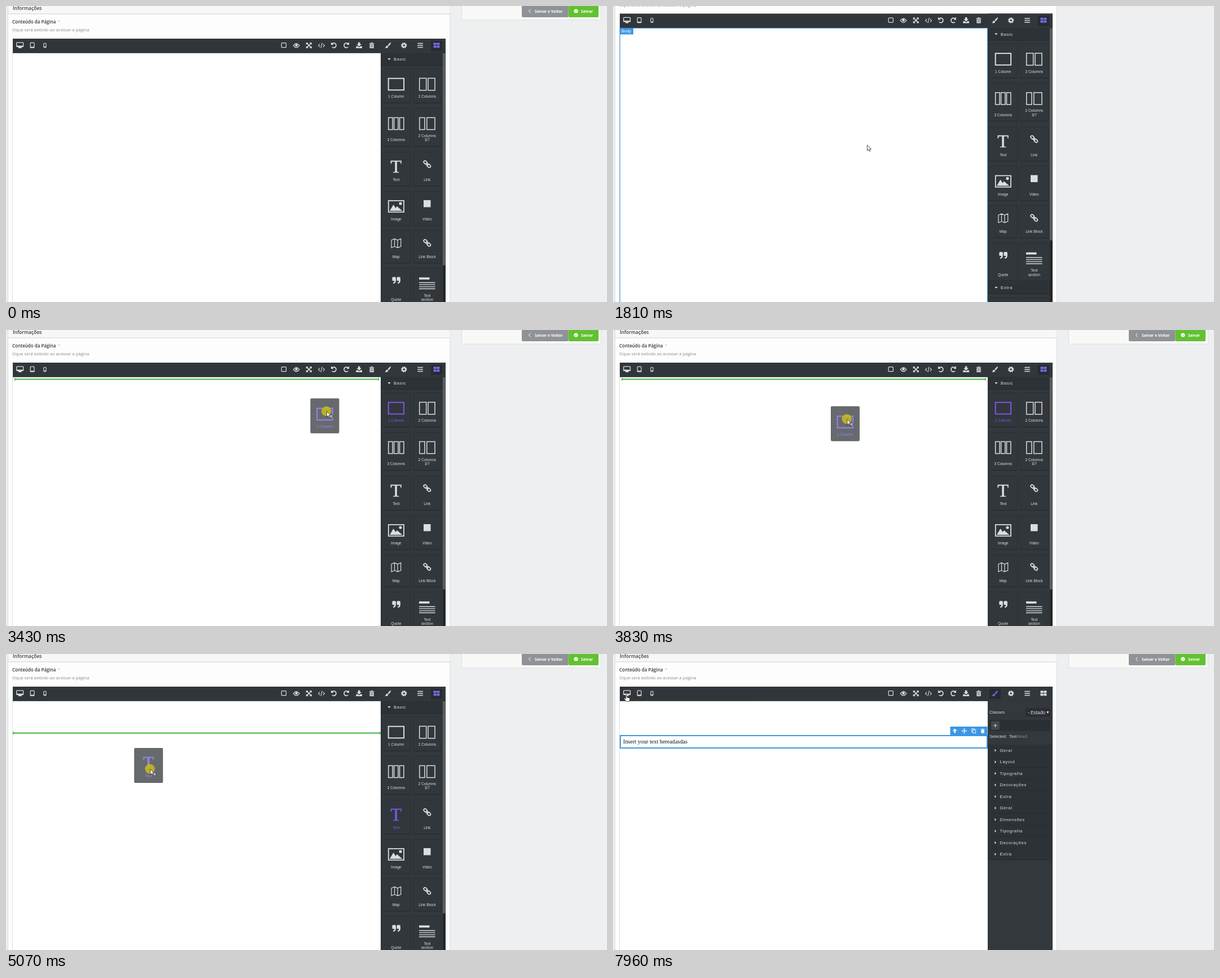
Recreate the animation shown at these times as an HTML page. Size 1065 by 526 pixels, loop 8 s.

```html
<!DOCTYPE html>
<html lang="pt">
<head>
<meta charset="utf-8">
<title>Page builder</title>
<style>
html, body { margin: 0; width: 100%; height: 100%; overflow: hidden; background: #edeff1; }
svg { display: block; width: 1065px; height: 526px; }
text { font: 6.66px "Liberation Sans", Arial, sans-serif; fill: currentColor; white-space: pre; }
.ui { font-family: "Open Sans", "Noto Sans", sans-serif; }
.mid { text-anchor: middle; }
.cat { font-size: 7.7px; letter-spacing: .64px; }
.line { fill: none; stroke: currentColor; }
.block, .tool { color: #dcdddd; }
.block.hot { color: #7a56e8; }
.tool.on { color: #746ce8; }
.tool .bg { fill: none; }
.tool.on .bg { fill: #272b30; }
</style>
</head>
<body>
<svg id="stage" viewBox="0 0 1065 526"></svg>
<script>
const LOOP = 8000, SCROLL = 44.5, BLUE = '#3b97e3', GREEN = '#62bd5f';
const stage = document.getElementById('stage');

const rect = (x, y, w, h, fill, more = '') =>
  `<rect x="${x}" y="${y}" width="${w}" height="${h}" fill="${fill}" ${more}/>`;
const frame = (x, y, w, h, sw = 1.5, more = '') =>
  `<rect x="${x}" y="${y}" width="${w}" height="${h}" class="line" stroke-width="${sw}" ${more}/>`;
const text = (x, y, s, more = '') => `<text x="${x}" y="${y}" ${more}>${s}</text>`;
const line = (d, sw = 1.5, more = '') => `<path d="${d}" class="line" stroke-width="${sw}" ${more}/>`;
const fill = (d, color = 'currentColor') => `<path d="${d}" fill="${color}"/>`;
const group = (id, body, more = '') => `<g id="${id}" ${more}>${body}</g>`;
const tool = (id, x, body) => group(id, rect(x - 10, 62, 20, 18, '', 'class="bg" rx="1"').replace('fill=""', '') + body, 'class="tool"');

// ---- page ----
const page = () =>
  rect(3.5, -20, 783, 640, '#fdfdfd', 'stroke="#dcdee0"') +
  rect(4, -20, 782.5, 34, '#f7f7f5') + rect(3, 13.5, 784, 1, '#d2d4d5') +
  text(12, 7, 'Informações', 'class="ui" style="font-size:8.5px;font-weight:600" fill="#333" color="#383b3e"') +
  text(11, 31, 'Conteúdo da Página', 'class="ui" style="font-size:8px;font-weight:600" color="#33373a"') +
  text(92, 30, '*', 'class="ui" color="#e5a09a"') +
  text(11, 45, 'Oque será exibido ao acessar a página', 'class="ui" style="font-size:7.65px" color="#85898d"') +
  rect(807.5, -20, 247, 45, '#f8f8f7', 'stroke="#dddfe1"') +
  rect(914, -10, 82.5, 30, '#8f9296', 'rx="2"') + rect(996.5, -10, 53.5, 30, '#62c132', 'rx="2"') +
  `<g color="#fff">${line('M929.5 5.5l-3 3.5 3 3.5', 1)}
   ${text(937, 12.2, 'Salvar e Voltar', 'class="ui" style="font-size:6.85px;font-weight:700"')}
   <circle cx="1010" cy="9" r="3.6" fill="#fff"/>
   <path d="M1008.3 9l1.3 1.4 2.2-2.6" stroke="#62c132" fill="none"/>
   ${text(1019, 12.2, 'Salvar', 'class="ui" style="font-size:6.85px;font-weight:700"')}</g>`;

// ---- toolbar ----
const undo = line('M577.6 67.2A4.2 4.2 0 1 1 577.8 73', 1.7) + fill('M576 64.3v4.8h4.8z');
const toolbar = () =>
  rect(12, 58, 767, 25.5, '#31363b') + rect(12, 82.5, 767, 1, '#272c30') +
  `<g class="tool">
  ${frame(18.8, 64.8, 11.8, 7.6, 1.3, 'rx="1"')}${rect(19, 70.5, 11.5, 2, 'currentColor')}${rect(22, 73, 5.5, 2, 'currentColor')}
  ${frame(43.2, 65.2, 6.8, 9, 1.2, 'rx="1"')}${rect(43.2, 72.4, 6.8, 1.6, 'currentColor')}
  ${frame(66.8, 66.2, 4.2, 7.4, 1.1, 'rx="1"')}${rect(67, 72.2, 4, 1.4, 'currentColor')}
  ${frame(488.2, 65.7, 8.2, 8, 1.2, 'rx="1.3"')}
  ${line('M509.3 70.2q5.3-7.4 10.6 0q-5.3 7.4-10.6 0z', 1.2)}<circle cx="514.6" cy="69.6" r="2.4" fill="currentColor"/>
  ${line('M533 66.3l7.6 7.6M540.6 66.3l-7.6 7.6', 1.6)}
  ${fill('M531.8 65v4l4-4zM541.8 65v4l-4-4zM531.8 75v-4l4 4zM541.8 75v-4l-4 4z')}
  ${line('M556.2 67.3l-2.6 2.9 2.6 2.9M561.8 67.3l2.6 2.9-2.6 2.9M560.2 65.4l-2.3 9.4', 1.1)}
  ${undo}<g transform="translate(1184 0) scale(-1 1)">${undo}</g>
  ${fill('M624 64.5h3.4v3.3h2.6l-4.3 4.2-4.3-4.2h2.6zM620.4 71.5h3l2.3 2 2.3-2h3v3.4h-10.6z')}
  ${fill('M643.8 66h2.6l.6-1.2h2.2l.6 1.2h2.6v1.2h-8.6zM644.5 67.9h7.2v7h-7.2z')}
  ${line('M646.6 69v4.6M648.1 69v4.6M649.6 69v4.6', .6, 'style="stroke:#31363b"')}</g>` +
  rect(664, 58, 115, 25.5, '#32373c') +
  tool('brush', 677, fill('M682.3 64.6q-3 1-6 5.2l1.8 1.6q4-4 4.2-6.8zM675.5 70.5l1.9 1.7q-.8 3.3-6.2 2.4 2-.8 2-2.6.6-1.6 2.3-1.5z')) +
  tool('gear', 705, '<circle cx="705.2" cy="70" r="4.3" class="line" stroke-width="2" stroke-dasharray="1.7 1.677"/><circle cx="705.2" cy="70" r="2.9" class="line" stroke-width="2.3"/>') +
  tool('bars', 734, line('M729.3 66.5h9.6M729.3 70h9.6M729.3 73.5h9.6', 1.5)) +
  tool('grid', 763, [757.5, 763.3].map(x => rect(x, 65.3, 5.1, 4, 'currentColor', 'rx=".6"') +
    rect(x, 70.2, 5.1, 4, 'currentColor', 'rx=".6"')).join(''));

// ---- block palette ----
const chain = y => `<g transform="translate(746.3 ${y}) rotate(45)">
  ${frame(-7.6, -2.3, 7, 4.6, 1.7, 'rx="2.2"')}${frame(.6, -2.3, 7, 4.6, 1.7, 'rx="2.2"')}${line('M-3 0h6', 1.5)}</g>`;
const mark = x => `M${x} 481.5h3q1.9 0 1.9 2v4.5q0 5-4.9 5.6v-2q2.4-.5 2.4-3h-2.4q-1.6 0-1.6-1.5v-4q0-1.6 1.6-1.6z`;
const rows = [[111.5, 60.5], [181.5, 67.5], [259.5, 60.5], [329.5, 60.5], [399, 57.5], [465.5, 67]];
const blocks = [
  ['1 Column', frame(677.7, 128.7, 27.4, 20.6, 2)],
  ['2 Columns', frame(732.7, 128.4, 12, 21.4) + frame(748, 128.4, 12, 21.4)],
  ['3 Columns', [677.7, 687.6, 697.5].map(x => frame(x, 198.4, 7.4, 21.2)).join('')],
  ['2 Columns|3/7', frame(732.8, 198.4, 9.2, 21.2) + frame(745.8, 198.4, 14.2, 21.2)],
  ['Text', text(691.2, 295.5, 'T', 'class="mid" style="font:32.5px \'Liberation Serif\',serif" stroke="currentColor" stroke-width=".5"')],
  ['Link', chain(281)],
  ['Image', frame(677.8, 346, 27.2, 20.2, 1.8) + fill('M680 364l6.5-11 4 6 2.4-3 9.5 8z') + '<circle cx="699" cy="351" r="2.6" fill="currentColor"/>'],
  ['Video', rect(740, 345, 12.5, 12.5, 'currentColor')],
  ['Map', line('M683 416l5.5-2.3 5.5 2.3 5.7-2.3v13.6l-5.7 2.3-5.5-2.3-5.5 2.3zM688.5 413.7v13.6M694 416v13.6', 1.2)],
  ['Link Block', chain(421)],
  ['Quote', fill(mark(686) + mark(694))],
  ['Text|section', rect(732, 482.3, 18.5, 3.8, 'currentColor') + line('M732 491.5h28.5M732 495.2h28.5M732 498.8h28.5M732 502.5h28.5', 1.3)]
];
const block = ([label, icon], i) => {
  const [y, h] = rows[i >> 1], x = i % 2 ? 721.5 : 666.5, words = label.split('|');
  const base = y + h - (i > 9 ? 8.3 : 9);
  return group('b' + i, rect(x, y, 50, h, '#32373b', 'stroke="#2a2f33" rx="1"') + rect(x, y + h, 50, 1, '#282c30') + icon +
    words.map((w, n) => text(x + 24.8, base - (words.length - 1 - n) * 7.4, w, 'class="mid"')).join(''), 'class="block"');
};
const heading = (y, s) => rect(664, y, 110, 22, '#2d3237') + rect(664, y + 21, 110, 1, '#24282c') +
  `<g color="#e0e1e1">${fill(`M676.3 ${y + 9}h5.4l-2.7 3z`)}${text(687, y + 13.2, s, 'class="cat"')}</g>`;
const palette = () => heading(84, 'Basic') + blocks.map(block).join('') + heading(534.5, 'Extra') +
  rect(666.5, 563, 50, 60, '#32373b', 'stroke="#2a2f33"') + rect(721.5, 563, 50, 60, '#32373b', 'stroke="#2a2f33"') +
  rect(774, 84, 5, 520, '#24282b') + rect(774, 84, 4.5, 377, '#5c6063');

// ---- style panel ----
const sectors = ['Geral', 'Layout', 'Tipografia', 'Decorações', 'Extra', 'Geral', 'Dimensões', 'Tipografia', 'Decorações', 'Extra'];
const styles = () => rect(664, 83.5, 115, 520, '#33383c') + '<g color="#dddede">' +
  text(667, 106, 'Classes', 'style="font-size:7.6px"') + rect(731, 96, 44, 15.5, '#2a2e32', 'rx="1"') +
  text(735, 106.5, '- Estado', 'style="font-size:8.3px"') + fill('M768 102h4.6l-2.3 4z') +
  rect(667, 117, 108, 20, '#2a2f33', 'rx="1"') + rect(670, 119.5, 15, 15, '#43484c', 'rx="1"') +
  line('M674.5 127h6M677.5 124v6', 1) + text(667, 149, 'Selected:', 'style="font-size:7.4px"') +
  text(702, 149, 'Text', 'style="font-size:7.3px"') + text(716, 149, '#imu3', 'color="#8b8f92"') +
  sectors.map((s, i) => {
    const y = 161 + i * 20.5;
    return rect(664, y, 113.5, 20.5, '#2d3237') + rect(664, y + 19.8, 113.5, .8, '#24292c') +
      fill(`M676.5 ${y + 7.8}v5l2.7-2.5z`) + text(685.5, y + 12.9, s, 'class="cat"');
  }).join('') + '</g>';

// ---- canvas overlays ----
const badge = (y, w, s) => rect(12, y, w, 11.5, BLUE) + text(15, y + 8.4, s, 'style="font-size:7.5px" color="#fff"');
const bodyHover = `<path d="M12.3 620V83.8H663.3V620" fill="none" stroke="${BLUE}"/>` + badge(83.5, 24, 'Body');
const textBox = () => rect(13, 145, 650, 22, 'none', `stroke="${BLUE}" stroke-width="2"`) +
  rect(597.5, 129, 66, 15.5, BLUE) + '<g color="#fff">' +
  fill('M605.7 132.6l4 4.2h-2.8v3.7h-2.4v-3.7h-2.8z') +
  line('M622.5 133v7.4M618.8 136.7h7.4', 1.1) +
  fill('M622.5 132l1.6 2h-3.2zM622.5 141.4l1.6-2h-3.2zM617.8 136.7l2-1.6v3.2zM627.2 136.7l-2-1.6v3.2z') +
  frame(635.7, 133, 5, 5.6, .9) + rect(637.7, 134.8, 5, 5.6, BLUE, 'stroke="#fff" stroke-width=".9"') +
  fill('M651.8 133.6h2l.4-.8h1.8l.4.8h2v.9h-6.6zM652.4 135h5.4v5.5h-5.4z') + '</g>';
const editBar = rect(12, 123.5, 89.5, 20, '#2d3236', 'rx="1.5"') + '<g color="#e4e4e4">' +
  text(17.5, 136, 'B', 'style="font-size:7.5px;font-weight:700"') + text(35, 136, 'I', 'style="font-size:7.5px;font-style:italic"') +
  text(49, 136, 'U', 'style="font-size:7.5px;text-decoration:underline"') +
  text(65, 136, 'S', 'style="font-size:7.5px;text-decoration:line-through"') +
  line('M80.5 125.5l16 15M82 135.5l5-3.5M89 131l5-4M85 139l4-4M91 138.5l4-2.5', 1.3) + '</g>';

// ---- cursors, hot spot at 0,0 ----
const arrow = '<path d="M0 0v10l2.3-2.1 1.5 3.4 1.6-.7-1.5-3.3h3.1z" fill="#fff" stroke="#222" stroke-width=".8"/>';
const cursors = {
  arrow,
  drag: '<circle r="8.7" cx="-.7" cy="-.4" fill="#c5b91c" opacity=".88"/>' + arrow +
    rect(5.2, 6.5, 5, 5, '#eee', 'stroke="#222" stroke-width=".9" rx="1"') + rect(6.6, 8.4, 2.2, 1, '#222'),
  move: ['#222" stroke-width="2.6', '#fff" stroke-width="1.1'].map(c =>
    `<path d="M0-5V5M-5 0H5M-1.6-3.8L0-5.4 1.6-3.8M-1.6 3.8L0 5.4 1.6 3.8M-3.8-1.6L-5.4 0-3.8 1.6M3.8-1.6L5.4 0 3.8 1.6" fill="none" stroke="${c}"/>`).join(''),
  beam: '<path d="M-2-4.6h1.4l.6.6.6-.6h1.4M0-4V4M-2 4.6h1.4l.6-.6.6.6h1.4" fill="none" stroke="#333" stroke-width=".9"/>',
  hand: '<path d="M-1-4.5q1-1 2 0v4l4 .8q1.3.4 1.2 2L5.6 6.8h-6L-4 2q0-1.7 1.6-1L-1 2.2z" fill="#fff" stroke="#222" stroke-width=".8" transform="translate(-.3 1)"/>'
};

stage.innerHTML = rect(0, 0, 1065, 526, '#edeff1') + group('page',
  page() + rect(11, 83, 1, 540, '#dcdedf') + rect(12, 83.5, 652, 540, '#fff') +
  rect(664, 83, 115, 540, '#33383c') + toolbar() + palette() + group('styles', styles()) +
  group('bodyHover', bodyHover) +
  group('textBlock', group('editBar', editBar) + textBox() + group('textBadge', badge(132.5, 20.5, 'Text')) +
    text(18, 159.3, '', 'id="typed" style="font:10.2px \'Liberation Serif\',\'Times New Roman\',serif" color="#111"') +
    rect(0, 150.3, .9, 11, '#111', 'id="caret"')) +
  group('drop', `<path id="dropLine" stroke="${GREEN}" stroke-width="2.4"/><path id="dropEnds" fill="${GREEN}"/>`)) +
  '<use id="ghost" opacity=".74"/>' +
  group('cursor', Object.keys(cursors).map(k => group('c-' + k, cursors[k])).join(''));

const $ = id => document.getElementById(id);
const show = (id, on) => $(id).style.display = on ? '' : 'none';
const within = (t, a, b) => t >= a && t < b;
const ease = p => p * p * (3 - 2 * p);

// time, x, y of the pointer
const path = [
  [380, 950, 310], [850, 451, 249], [1050, 451, 249], [1120, 450.5, 247], [2060, 450.5, 247], [2550, 709, 128],
  [2680, 708, 126], [2880, 695, 133], [3080, 695, 133], [3830, 415, 158.5], [4230, 415, 158.5],
  [4540, 696, 292], [4640, 694, 297], [5000, 255.7, 204.5], [5730, 255.7, 204.5], [6200, 130, 153],
  [7480, 130, 153], [7700, 6, 98], [7900, 24, 76.5], [8000, 24, 76.5]
];
// kind of pointer from each time on
const kinds = [[380, 'arrow'], [2420, 'move'], [3080, 'drag'], [3900, 'arrow'], [4490, 'move'], [4650, 'drag'],
  [5140, 'arrow'], [6090, 'beam'], [7520, 'arrow'], [7820, 'hand']];

function pointer(t) {
  const i = path.findIndex(k => k[0] > t);
  if (i < 1) return path[0].slice(1);
  const [a, ax, ay] = path[i - 1], [b, bx, by] = path[i], p = ease((t - a) / (b - a));
  return [ax + (bx - ax) * p, ay + (by - ay) * p];
}

function scrollAt(t) {
  const ramp = (a, d) => ease(Math.min(1, Math.max(0, (t - a) / d)));
  return SCROLL * (ramp(1350, 180) - ramp(1880, 180));
}

function dropMark(x1, x2, y) {
  $('dropLine').setAttribute('d', `M${x1} ${y}H${x2}`);
  $('dropEnds').setAttribute('d', `M${x1} ${y - 3}l4 3-4 3zM${x2} ${y - 3}l-4 3 4 3z`);
}

function draw(t) {
  const [x, y] = pointer(t);
  const kind = (kinds.filter(k => k[0] <= t).pop() || [])[1];
  $('page').setAttribute('transform', `translate(0 ${-scrollAt(t)})`);
  $('cursor').setAttribute('transform', `translate(${x} ${y})`);
  for (const k in cursors) show('c-' + k, k === kind);

  const first = t < 3950, styling = t >= 5270;
  $('b0').classList.toggle('hot', within(t, 2600, 3960));
  $('b4').classList.toggle('hot', within(t, 4550, 5270));
  $('grid').classList.toggle('on', !styling);
  $('brush').classList.toggle('on', styling);
  show('styles', styling);

  const dragging = kind === 'drag';
  show('ghost', dragging);
  if (dragging) {
    const [gx, gy] = first ? [695, 134] : [694.5, 296.5];
    $('ghost').setAttribute('href', first ? '#b0' : '#b4');
    $('ghost').setAttribute('transform', `translate(${x - gx} ${y - gy})`);
  }
  show('drop', (dragging || within(t, 3900, 3960)) && x < 655);
  if (first) dropMark(15, 661, 87.5); else dropMark(12, 663.5, 140.5);

  show('bodyHover', (within(t, 500, 2420) && x < 664) || within(t, 4230, 4490) || within(t, 5760, 6060));

  const hover = within(t, 6060, 7560), editing = within(t, 6240, 7600);
  show('textBlock', t >= 5200);
  show('textBadge', hover);
  show('editBar', editing);
  const n = Math.max(0, Math.min(7, Math.floor((t - 6600) / 100) + 1));
  $('typed').textContent = 'Insert your text here' + 'adasdas'.slice(0, n);
  show('caret', editing);
  if (editing) $('caret').setAttribute('x', 18 + $('typed').getComputedTextLength());
}

const start = performance.now();
function tick() {
  draw((performance.now() - start) % LOOP);
  requestAnimationFrame(tick);
}
tick();
</script>
</body>
</html>
```
